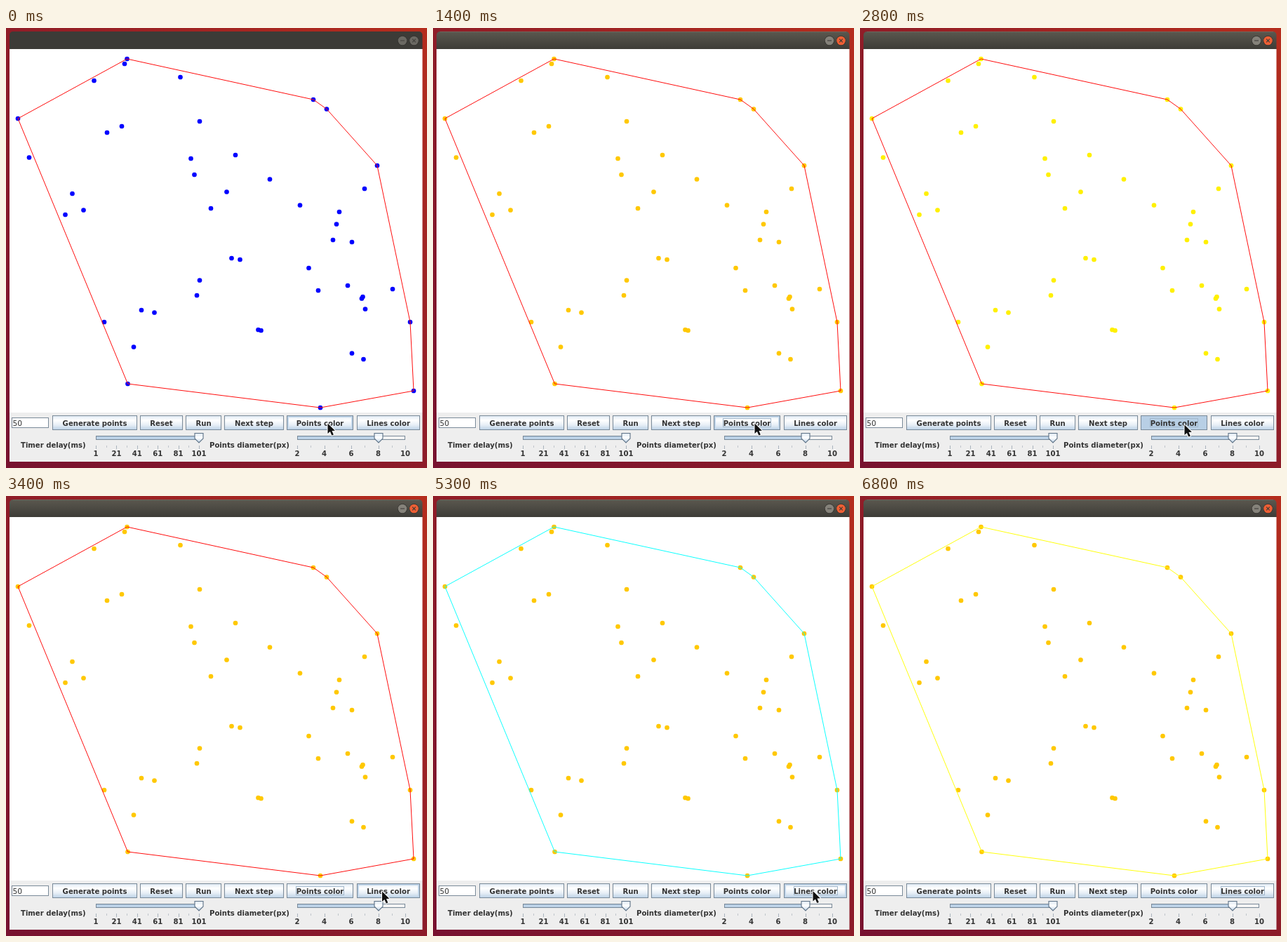
An HTML page with a canvas for the animation above (8300 ms loop, 600 by 627 pixels).

```html
<!DOCTYPE html>
<html lang="en">
<head>
<meta charset="utf-8">
<title>Convex hull</title>
<style>
html, body { margin: 0; width: 100%; height: 100%; overflow: hidden; background: #8c1a2a; }
canvas { display: block; }
</style>
</head>
<body>
<canvas id="stage" width="600" height="627"></canvas>
<script>
const ctx = document.getElementById('stage').getContext('2d');
const LOOP = 8300, STEP = 100;
const INK = '#333', EDGE = '#7a8a99', SKY = '#b8cfe5';

const hull = [[17, 129], [172.5, 44], [438, 102], [457, 115.5], [529, 196],
  [576, 419], [581, 517], [448, 541], [173.5, 507]];
const inner = [[169, 51], [125.5, 75], [248.5, 70], [276, 133], [165, 140], [144, 149],
  [33, 184.5], [263.5, 186], [327, 181], [268.5, 209], [376, 215.5], [314.5, 233.5],
  [511, 229], [94.5, 236], [419, 252.5], [110.5, 259.5], [84.5, 266], [292, 257],
  [475, 262], [471, 279.5], [466, 302], [493, 305], [321.5, 328], [333.5, 330],
  [431.5, 342], [276, 359.5], [272, 381], [445, 374], [487, 367], [551, 372],
  [508.5, 383], [507, 385.5], [512, 400.5], [193, 402], [211.5, 405.5], [140, 419],
  [182, 454.5], [359.5, 430], [363.5, 431], [493, 463.5], [509.5, 472]];
const points = [...hull, ...inner];

// Each click: [press time, colour set on release]
const pointClicks = [[100, '#0ff'], [700, '#ffc800'], [1200, '#ffc800'],
  [1800, '#0f0'], [2300, '#fff000'], [2700, '#ffc800']];
const lineClicks = [[3800, '#f00'], [4200, '#f0f'], [4700, '#0f0'],
  [5100, '#0ff'], [5700, '#00f'], [6300, '#ff0']];
const HOLD = 200;

const buttons = [['Generate points', 66, 121], ['Reset', 191, 61], ['Run', 256, 51],
  ['Next step', 311, 85], ['Points color', 400, 95], ['Lines color', 500, 90]];

// Cursor stops: [time, x, y]
const stops = [[0, 458.5, 563.5], [2500, 458.5, 563.5], [2600, 462.5, 565.5],
  [3000, 462.5, 565.5], [3400, 536, 563.5], [3500, 536, 563.5],
  [3700, 540, 563], [4900, 540, 563], [5100, 541.5, 563], [LOOP, 541.5, 563]];
const LEAVE = 6600;

const isDown = (clicks, t) => clicks.some(([at]) => t >= at && t < at + HOLD);
const colourAt = (clicks, first, t) =>
  clicks.reduce((c, [at, next]) => t >= at + HOLD ? next : c, first);

function cursorAt(t) {
  const i = stops.findIndex(s => s[0] > t);
  const [t0, x0, y0] = stops[i - 1], [t1, x1, y1] = stops[i];
  const k = (t - t0) / (t1 - t0);
  return [x0 + (x1 - x0) * k, y0 + (y1 - y0) * k];
}

function rect(x, y, w, h, fill) {
  ctx.fillStyle = fill;
  ctx.fillRect(x, y, w, h);
}

function frame(x, y, w, h, colour) {
  ctx.strokeStyle = colour;
  ctx.lineWidth = 1;
  ctx.strokeRect(x + .5, y + .5, w - 1, h - 1);
}

function gradient(x0, y0, x1, y1, ...colours) {
  const g = ctx.createLinearGradient(x0, y0, x1, y1);
  colours.forEach((c, i) => g.addColorStop(i / (colours.length - 1), c));
  return g;
}

function path(list, close) {
  ctx.beginPath();
  list.forEach(p => ctx.lineTo(...p));
  if (close) ctx.closePath();
}

function disc(x, y, r, fill) {
  ctx.fillStyle = fill;
  ctx.beginPath();
  ctx.arc(x, y, r, 0, 2 * Math.PI);
  ctx.fill();
}

function label(text, x, y, align = 'left', weight = 'bold', size = 10.1) {
  ctx.font = `${weight} ${size}px "DejaVu Sans", sans-serif`;
  ctx.textAlign = align;
  ctx.fillStyle = INK;
  ctx.fillText(text, x, y);
}

function titleBar(active) {
  ctx.fillStyle = active ? gradient(0, 5, 0, 30, '#5b584f', '#3d3c37') : '#3c3b37';
  ctx.beginPath();
  ctx.roundRect(5, 5, 588.5, 25, [5, 5, 0, 0]);
  ctx.fill();
  if (active) rect(10, 5, 579, 1, '#6c685e');
  const mark = active ? '#3a3934' : '#42413c';
  disc(565, 18, 7, '#33322e');
  disc(565, 18, 6.3, active ? '#85827a' : '#6b6963');
  disc(581.5, 18, 7, '#33322e');
  disc(581.5, 18, 6.3, active ? '#ee5f35' : '#6b6963');
  rect(562, 17.5, 6, 1, mark);
  ctx.strokeStyle = mark;
  ctx.lineWidth = 1.1;
  for (const d of [-2.3, 2.3]) {
    path([[581.5 - d, 15.7], [581.5 + d, 20.3]]);
    ctx.stroke();
  }
}

function button([text, x, w], { hover, down, focus }) {
  const y = 552, h = 21, mid = x + w / 2;
  rect(x, y, w, h, down ? SKY : gradient(0, y, 0, y + h, '#dde8f3', '#fff', '#e6eef6', SKY));
  frame(x, y, w, h, EDGE);
  if (hover && !down) {
    frame(x + 1, y + 1, w - 2, h - 2, SKY);
    frame(x + 2, y + 2, w - 4, h - 4, '#c6d8ea');
  }
  label(text, mid, 566.5, 'center');
  if (focus) {
    const tw = Math.round(ctx.measureText(text).width) + 1;
    frame(Math.round(mid - tw / 2), 556, tw, 13, '#a3b8cc');
  }
}

function slider(x0, x1, thumb, first, gap, count) {
  const w = x1 - x0, pitch = w / (count - 1);
  rect(x0, 581, w, 6, '#f4f4f4');
  rect(x0, 581, thumb - x0, 6, gradient(0, 581, 0, 587, '#8fabc8', '#c8dcef', '#a3bdd6'));
  frame(x0, 581, w, 6, EDGE);
  for (let i = 0; i < 2 * count - 1; i++)
    rect(Math.round(x0 + i * pitch / 2), 595, 1, i % 2 ? 3 : 5, i % 2 ? '#bfc5cb' : '#a9b3bd');
  for (let i = 0; i < count; i++)
    label(first + i * gap, x0 + i * pitch, 610.3, 'center');
  path([[-6, 577.5], [6, 577.5], [6, 585], [0, 591], [-6, 585]]
    .map(([dx, y]) => [thumb + dx, y]), true);
  ctx.fillStyle = gradient(0, 577, 0, 591, '#dde8f3', '#fff', SKY);
  ctx.fill();
  ctx.strokeStyle = '#5f7387';
  ctx.lineWidth = 1.1;
  ctx.stroke();
}

function cursor(x, y) {
  path([[0, 0], [0, 14.5], [3.4, 11.4], [5.8, 17], [8.4, 15.9], [6, 10.5], [10.4, 10.3]]
    .map(([dx, dy]) => [x + dx, y + dy]), true);
  ctx.lineJoin = 'round';
  ctx.lineWidth = 2;
  ctx.strokeStyle = '#fff';
  ctx.stroke();
  ctx.fillStyle = '#111';
  ctx.fill();
  ctx.lineJoin = 'miter';
}

function draw(t) {
  rect(0, 0, 600, 627, gradient(0, 627, 600, 0, '#78122f', '#8e1c28', '#b52d1d'));
  titleBar(t >= 100);
  rect(5, 30, 588.5, 518, '#fff');
  rect(5, 548, 588.5, 70, '#eee');

  const dot = colourAt(pointClicks, '#00f', t);
  points.forEach(([x, y]) => disc(x, y, 3.35, dot));
  path(hull, true);
  ctx.strokeStyle = colourAt(lineClicks, '#f00', t);
  ctx.lineWidth = .95;
  ctx.stroke();

  rect(8, 555, 53, 15, '#fff');
  frame(8, 555, 53, 15, EDGE);
  label('50', 9.5, 566.5, 'left', 'normal', 10.8);

  const [x, y] = cursorAt(t), shown = t < LEAVE;
  buttons.forEach((b, i) => button(b, {
    hover: shown && x >= b[1] && x < b[1] + b[2],
    down: i === 4 ? isDown(pointClicks, t) : i === 5 && isDown(lineClicks, t),
    focus: i === 4 ? t >= 800 && t < 3800 : i === 5 && t >= 3800
  }));

  label('Timer delay(ms)', 21, 598);
  label('Points diameter(px)', 290, 598);
  slider(128, 275, 275, 1, 20, 6);
  slider(415, 569, 531, 2, 2, 5);
  if (shown) cursor(x, y);
}

const start = performance.now();
function tick() {
  const t = (performance.now() - start) % LOOP;
  draw(Math.floor(t / STEP) * STEP);
  requestAnimationFrame(tick);
}
tick();
</script>
</body>
</html>
```
